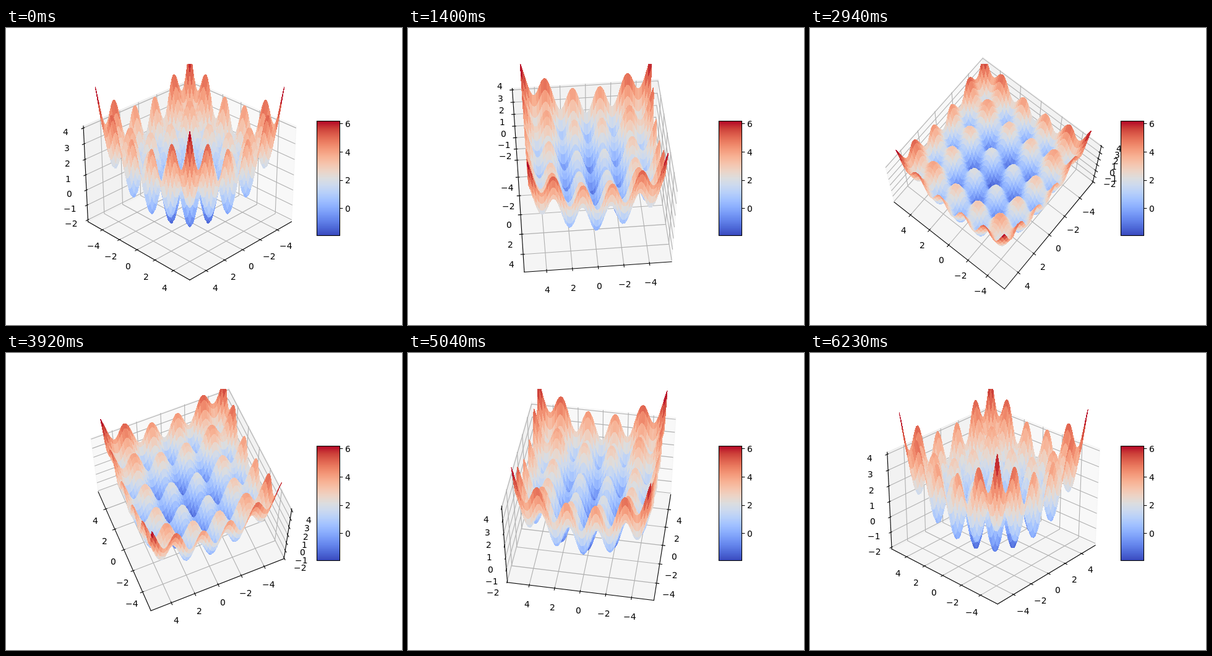
Animation, 640 px wide and 480 px high, one loop 6300 ms. Source, as an HTML page with a canvas:

```html
<!DOCTYPE html>
<html lang="en">
<head>
<meta charset="utf-8">
<title>Rotating surface plot</title>
<style>
  html, body { margin: 0; width: 100%; height: 100%; overflow: hidden; background: #fff; }
  canvas { display: block; }
</style>
</head>
<body>
<canvas id="stage" width="640" height="480"></canvas>
<script>
const W = 640, H = 480, STEPS = 90, STEP_MS = 70;
const ctx = document.getElementById('stage').getContext('2d');

// ---- colour map ----
const STOPS = ('3b4cc0 4d68d7 6282ea 779af7 8db0fe a3c2ff b8d0f9 ccd9ee dddddd ' +
  'ecd3c5 f5c4ad f7b194 f49a7b ec7f63 de604d cb3e38 b40426').split(' ')
  .map(hex => [0, 2, 4].map(k => parseInt(hex.substr(k, 2), 16)));

function coolwarm(t) {
  const level = Math.max(0, Math.min(255, Math.floor(t * 256)));
  const pos = level / 255 * (STOPS.length - 1);
  const i = Math.min(STOPS.length - 2, Math.floor(pos));
  return STOPS[i].map((v, k) => Math.round(v + (STOPS[i + 1][k] - v) * (pos - i)));
}

// ---- surface ----
const N = 100;
const axisValue = i => -5 + 10 * i / (N - 1);
const wave = v => 0.1 * v * v - Math.cos(3 * v);
const vertices = [];
for (let r = 0; r < N; r++)
  for (let c = 0; c < N; c++) {
    const x = axisValue(c), y = axisValue(r);
    vertices.push([x, y, wave(x) + wave(y)]);
  }

function perimeter(r0, r1, c0, c1) {
  const ids = [], add = (r, c) => ids.push(r * N + c);
  for (let c = c0; c < c1; c++) add(r0, c);
  for (let r = r0; r < r1; r++) add(r, c1);
  for (let c = c1; c > c0; c--) add(r1, c);
  for (let r = r1; r > r0; r--) add(r, c0);
  return ids;
}

const cells = [];
for (let r = 0; r < N - 1; r += 2)
  for (let c = 0; c < N - 1; c += 2) {
    const ids = perimeter(r, Math.min(r + 2, N - 1), c, Math.min(c + 2, N - 1));
    const mean = ids.reduce((sum, id) => sum + vertices[id][2], 0) / ids.length;
    cells.push({ ids, mean, depth: 0 });
  }
const vMin = Math.min(...cells.map(c => c.mean));
const vMax = Math.max(...cells.map(c => c.mean));
for (const cell of cells) {
  const [r, g, b] = coolwarm((cell.mean - vMin) / (vMax - vMin));
  cell.color = (255 << 24 | b << 16 | g << 8 | r) >>> 0;
}

// ---- camera ----
const CX = 297, CY = 237.4, ZOOM = 369.6 / 0.185, DISTANCE = 10;
let ca, sa, ce, se;

function setCamera(azim, elev) {
  const rad = Math.PI / 180;
  ca = Math.cos(azim * rad); sa = Math.sin(azim * rad);
  ce = Math.cos(elev * rad); se = Math.sin(elev * rad);
}

function project([x, y, z]) {
  const wx = x / 9.625, wy = y / 9.625, wz = (z - 1) / 7;
  const toward = wx * ca + wy * sa;
  const depth = DISTANCE - toward * ce - wz * se;
  const k = ZOOM / depth;
  return [CX + k * (wy * ca - wx * sa), CY - k * (wz * ce - toward * se), depth];
}

// ---- hard-edged fill of every touched pixel, clipped to the axes ----
const CLIP_TOP = 58, CLIP_BOTTOM = 427;
const layer = document.createElement('canvas');
layer.width = W; layer.height = H;
const layerCtx = layer.getContext('2d');
const image = layerCtx.createImageData(W, H);
const pixels = new Uint32Array(image.data.buffer);

function fillPolygon(points, color) {
  const ys = points.map(p => p[1]);
  const top = Math.max(CLIP_TOP, Math.floor(Math.min(...ys)));
  const bottom = Math.min(CLIP_BOTTOM, Math.ceil(Math.max(...ys)));
  for (let row = top; row < bottom; row++) {
    let left = W, right = 0;
    points.forEach((a, i) => {
      const b = points[(i + 1) % points.length];
      const y0 = Math.max(row, Math.min(a[1], b[1]));
      const y1 = Math.min(row + 1, Math.max(a[1], b[1]));
      if (y0 >= y1) return;
      const slope = (b[0] - a[0]) / (b[1] - a[1]);
      const x0 = a[0] + (y0 - a[1]) * slope, x1 = a[0] + (y1 - a[1]) * slope;
      left = Math.min(left, x0, x1);
      right = Math.max(right, x0, x1);
    });
    if (left < right) pixels.fill(color, row * W + Math.floor(left), row * W + Math.ceil(right));
  }
}

function drawSurface() {
  const screen = vertices.map(project);
  for (const cell of cells)
    cell.depth = cell.ids.reduce((sum, id) => sum - 1 / screen[id][2], 0) / cell.ids.length;
  pixels.fill(0);
  for (const cell of [...cells].sort((a, b) => b.depth - a.depth))
    fillPolygon(cell.ids.map(id => screen[id]), cell.color);
  layerCtx.putImageData(image, 0, 0);
  ctx.drawImage(layer, 0, 0);
}

// ---- axes ----
const LOW = [-5.5 * 25 / 24, -5.5 * 25 / 24, -2.125];
const HIGH = [5.5 * 25 / 24, 5.5 * 25 / 24, 4.125];
const CENTER = [0, 0, 1];
const DELTA = [11 / 12, 11 / 12, 0.5];
const LABEL_OFFSET = 1.0373;
const AXES = [
  { near: 1, tickDir: 1, ticks: [-4, -2, 0, 2, 4], pane: '#f2f2f2' },
  { near: 0, tickDir: 0, ticks: [-4, -2, 0, 2, 4], pane: '#e6e6e6' },
  { near: 0, tickDir: 0, ticks: [-2, -1, 0, 1, 2, 3, 4], pane: '#ececec' }
];
const replace = (point, index, value) => point.map((v, i) => i === index ? value : v);

function trace(points) {
  ctx.beginPath();
  for (const p of points) {
    const [x, y] = project(p);
    ctx.lineTo(x, y);
  }
}

function strokeLine(points, color, cap) {
  trace(points);
  ctx.strokeStyle = color;
  ctx.lineCap = cap;
  ctx.stroke();
}

function drawLabel(value, x, top) {
  const text = String(value).replace('-', '\u2212');
  ctx.fillText(text, Math.round(x - ctx.measureText(text).width / 2), Math.round(top + 11.3));
}

function drawPane(index, far, near) {
  const u = (index + 1) % 3, v = (index + 2) % 3;
  trace([far, replace(far, u, near[u]), replace(replace(far, u, near[u]), v, near[v]), replace(far, v, near[v])]);
  ctx.globalAlpha = 0.5;
  ctx.fillStyle = ctx.strokeStyle = AXES[index].pane;
  ctx.lineWidth = 1.39;
  ctx.fill();
  ctx.stroke();
  ctx.globalAlpha = 1;
}

function drawAxis(index, far, near) {
  const { near: side, tickDir, ticks } = AXES[index];
  const start = replace(far, side, near[side]);
  const u = (index + 1) % 3, v = (index + 2) % 3;
  ctx.lineWidth = 1.11;
  strokeLine([start, replace(start, index, near[index])], '#000', 'square');
  for (const tick of ticks) {
    const p = replace(far, index, tick);
    strokeLine([replace(p, u, near[u]), p, replace(p, v, near[v])], '#b0b0b0', 'butt');
  }
  const outward = Math.sign(start[tickDir]) * DELTA[tickDir];
  ctx.fillStyle = '#000';
  for (const tick of ticks) {
    const p = replace(start, index, tick);
    strokeLine([-0.1, 0.2].map(f => replace(p, tickDir, p[tickDir] + f * outward)), '#000', 'square');
    const [x, y] = project(p.map((c, i) =>
      i === index ? c : c + (c < CENTER[i] ? -1 : 1) * LABEL_OFFSET * DELTA[i]));
    drawLabel(tick, x, y);
  }
}

function drawColorbar() {
  const left = 502, top = 150, right = 539, bottom = 334.8;
  const span = bottom - top;
  for (let y = top; y < bottom; y++) {
    ctx.fillStyle = `rgb(${coolwarm((bottom - y - 0.5) / span)})`;
    ctx.fillRect(left, y, right - left, 1);
  }
  ctx.strokeStyle = ctx.fillStyle = '#000';
  ctx.lineWidth = 1.11;
  ctx.lineCap = 'butt';
  ctx.strokeRect(left + 0.5, top + 0.5, right - left, 185);
  for (const v of [0, 2, 4, 6]) {
    const y = bottom - (v - vMin) / (vMax - vMin) * span;
    ctx.beginPath();
    ctx.moveTo(right + 0.5, Math.round(y) + 0.5);
    ctx.lineTo(right + 5.4, Math.round(y) + 0.5);
    ctx.stroke();
    ctx.fillText(v, 548, Math.round(y + 5.7));
  }
}

// The opening view sits at 30 degrees; after it the camera climbs from 30 to 73 and sinks to 29.
const elevation = step => step ? 73.5 - Math.abs(step - 44.5) : 30;

function draw(step) {
  setCamera(45 + 2 * step, elevation(step));
  const highIsFar = [ca < 0, sa < 0, false];
  const far = highIsFar.map((high, i) => high ? HIGH[i] : LOW[i]);
  const near = highIsFar.map((high, i) => high ? LOW[i] : HIGH[i]);
  ctx.fillStyle = '#fff';
  ctx.fillRect(0, 0, W, H);
  ctx.font = '13.889px "DejaVu Sans", sans-serif';
  for (let i = 0; i < 3; i++) drawPane(i, far, near);
  for (let i = 0; i < 3; i++) drawAxis(i, far, near);
  drawSurface();
  drawColorbar();
}

let shown = -1;
function tick() {
  const step = Math.floor(performance.now() / STEP_MS) % STEPS;
  if (step !== shown) draw(shown = step);
  requestAnimationFrame(tick);
}
tick();
</script>
</body>
</html>
```
